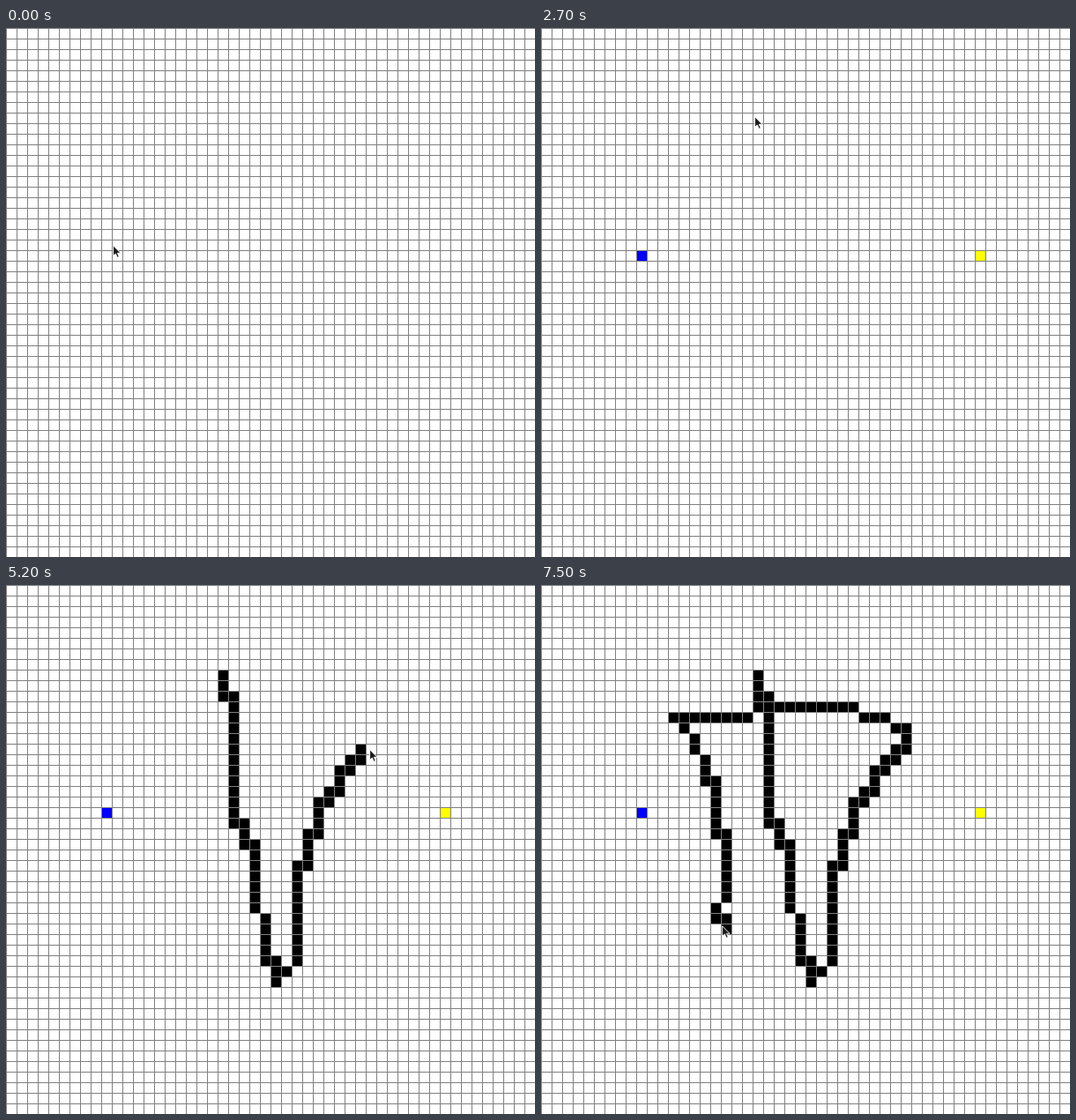
An HTML page without scripts that plays this animation: 600x600 px, repeating every 8000 ms.

```html
<!DOCTYPE html>
<html lang="en">
<head>
<meta charset="utf-8">
<title>Drawing walls on a grid</title>
<style>
  /* number of wall cells drawn so far */
  @property --n { syntax: "<integer>"; inherits: true; initial-value: 0; }

  html, body { margin: 0; width: 100%; height: 100%; overflow: hidden; background: #fff; }
  svg { display: block; width: 600px; height: 600px; }

  .start, .goal, .walls, .cursor { animation: 8s steps(1) -5ms infinite; }
  .start { fill: #00f; animation-name: place-start; }
  .goal { fill: #ff0; animation-name: place-goal; }
  .walls { animation-name: draw; }
  .cursor { animation-name: move; }

  /* --i: cells drawn before this run */
  .walls path {
    fill: none;
    stroke: #000;
    stroke-width: 1;
    stroke-dasharray: max(0px, calc((var(--n) - var(--i)) * 1px)) 999px;
  }

  @keyframes place-start { 0% { opacity: 0 } 7.5%, 100% { opacity: 1 } }
  @keyframes place-goal { 0% { opacity: 0 } 23.75%, 100% { opacity: 1 } }

  /* the picture advances every 100 ms, which is 1.25% */
  @keyframes draw {
    0%, 35% { --n: 0 }
    36.25% { --n: 1; animation-timing-function: steps(6) }
    43.75% { --n: 17; animation-timing-function: steps(2) }
    46.25% { --n: 22; animation-timing-function: steps(5) }
    52.5% { --n: 33 }
    53.75% { --n: 34; animation-timing-function: steps(3) }
    57.5% { --n: 42; animation-timing-function: steps(3) }
    61.25% { --n: 50; animation-timing-function: steps(3) }
    65% { --n: 62 }
    66.25% { --n: 65 }
    67.5% { --n: 69 }
    68.75% { --n: 74 }
    70% { --n: 77; animation-timing-function: steps(3) }
    73.75% { --n: 85; animation-timing-function: steps(2) }
    76.25% { --n: 87 }
    77.5% { --n: 87; animation-timing-function: steps(2) }
    80% { --n: 88; animation-timing-function: steps(2) }
    82.5% { --n: 91; animation-timing-function: steps(2) }
    85% { --n: 96; animation-timing-function: steps(3) }
    88.75% { --n: 105 }
    90% { --n: 106 }
    91.25% { --n: 108 }
    93.75%, 100% { --n: 110 }
  }

  @keyframes move {
    0% { transform: translate(121px, 246px) }
    1.25% { transform: translate(121px, 246px); animation-timing-function: steps(2) }
    3.75% { transform: translate(111px, 253px) }
    6.25% { transform: translate(111px, 253px); animation-timing-function: steps(2) }
    8.75% { transform: translate(107px, 256px) }
    10% { transform: translate(107px, 256px); animation-timing-function: steps(3) }
    13.75% { transform: translate(453px, 280px) }
    15% { transform: translate(453px, 280px); animation-timing-function: steps(3) }
    18.75% { transform: translate(490px, 254px); animation-timing-function: steps(2) }
    21.25% { transform: translate(498px, 262px) }
    22.5% { transform: translate(498px, 262px); animation-timing-function: steps(9) }
    33.75% { transform: translate(242px, 100px) }
    36.25% { transform: translate(245px, 108px); animation-timing-function: steps(6) }
    43.75% { transform: translate(265px, 275px); animation-timing-function: steps(2) }
    46.25% { transform: translate(282px, 328px); animation-timing-function: steps(5) }
    52.5% { transform: translate(305px, 443px) }
    53.75% { transform: translate(317px, 438px); animation-timing-function: steps(3) }
    57.5% { transform: translate(333px, 338px); animation-timing-function: steps(3) }
    61.25% { transform: translate(352px, 260px); animation-timing-function: steps(3) }
    65% { transform: translate(412px, 186px) }
    66.25% { transform: translate(409px, 160px) }
    67.5% { transform: translate(358px, 142px) }
    68.75% { transform: translate(302px, 134px) }
    70% { transform: translate(265px, 132px); animation-timing-function: steps(3) }
    73.75% { transform: translate(167px, 149px); animation-timing-function: steps(2) }
    76.25% { transform: translate(148px, 148px) }
    77.5% { transform: translate(148px, 148px); animation-timing-function: steps(2) }
    80% { transform: translate(170px, 174px); animation-timing-function: steps(2) }
    82.5% { transform: translate(186px, 210px); animation-timing-function: steps(2) }
    85% { transform: translate(197px, 262px); animation-timing-function: steps(3) }
    88.75% { transform: translate(207px, 341px) }
    90% { transform: translate(205px, 361px) }
    91.25% { transform: translate(201px, 380px) }
    93.75%, 100% { transform: translate(205px, 386px) }
  }
</style>
</head>
<body>
<svg viewBox="0 0 600 600">
  <defs>
    <pattern id="grid" width="12" height="12" patternUnits="userSpaceOnUse">
      <path d="M0 0H12V1H1V12H0Z" fill="#808080" shape-rendering="crispEdges"/>
    </pattern>
  </defs>

  <g transform="scale(12)">
    <rect class="start" x="9" y="21" width="1" height="1"/>
    <rect class="goal" x="41" y="21" width="1" height="1"/>
    <g class="walls">
      <path style="--i:0" d="M20.5 8V10.5H21.5V22.5H22.5V24.5H23.5V31"/>
      <path style="--i:26" d="M24.5 31V35.5H25.5V38"/>
      <path style="--i:34" d="M26 36.5H27"/>
      <path style="--i:35" d="M27.5 36V26.5H28.5V23.5H29.5V20.5H30.5V19.5H31.5V17.5H32.5V16.5H33.5V15.5H34.5V13.5H33"/>
      <path style="--i:66" d="M33 12.5H30"/>
      <path style="--i:69" d="M30 11.5H20"/>
      <path style="--i:79" d="M20 12.5H12"/>
      <path style="--i:87" d="M13.5 13V14"/>
      <path style="--i:88" d="M14.5 14V16"/>
      <path style="--i:90" d="M15.5 16V18.5H16.5V23.5H17.5V30"/>
      <path style="--i:106" d="M16.5 30V31.5H17.5V33"/>
    </g>
  </g>

  <rect width="600" height="600" fill="url(#grid)"/>

  <g class="cursor">
    <path d="M.6 .8V12.4L3.3 10L5.3 14.3L7.3 13.4L5.3 9.3H9Z" fill="#1a1a1a" stroke="#fff" stroke-width=".9"/>
  </g>
</svg>
</body>
</html>
```
